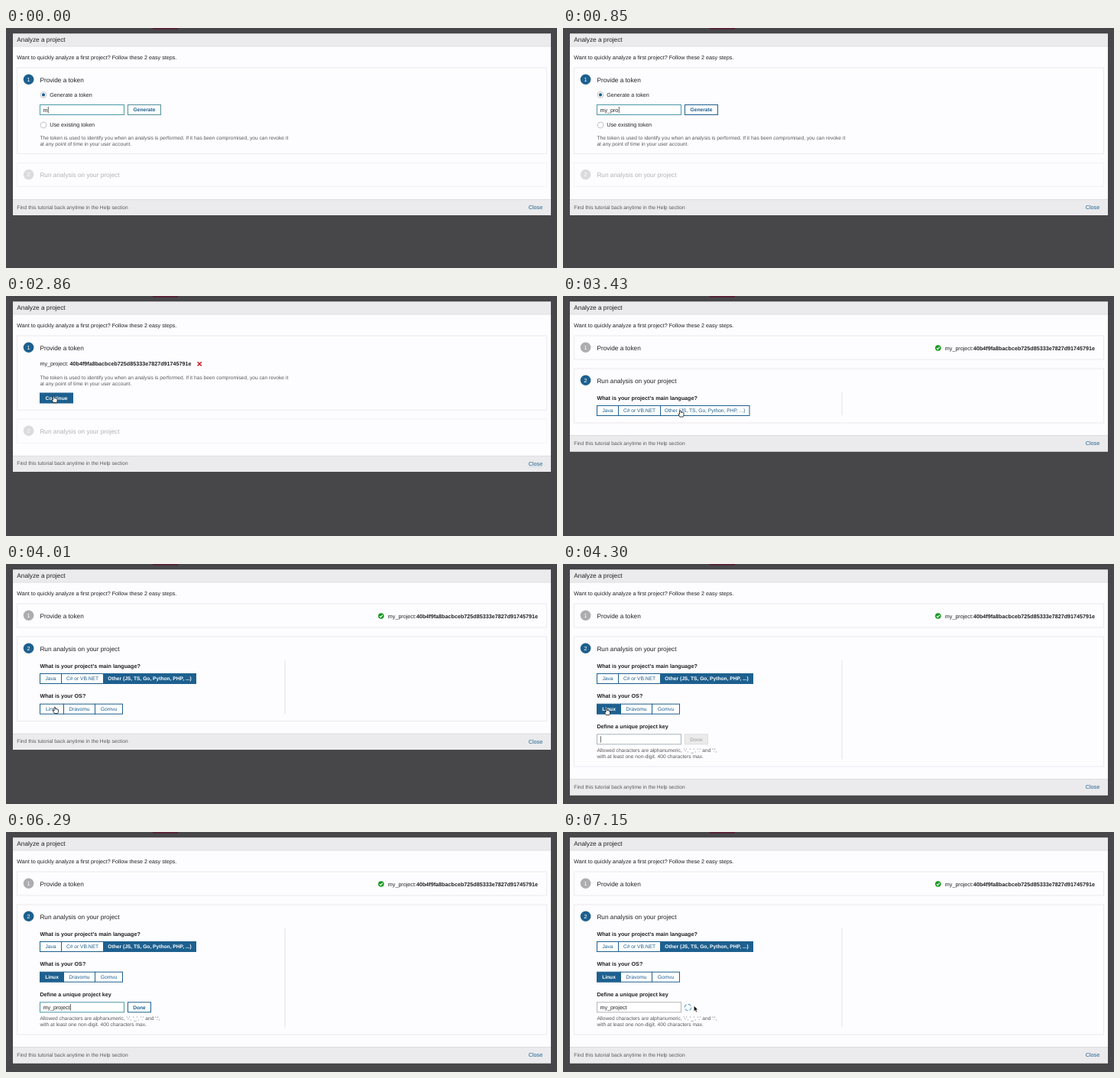
An HTML page for the animation above (7.29 s loop, 721x314 px).

```html
<!DOCTYPE html>
<html lang="en">
<head>
<meta charset="utf-8">
<title>Analyze a project</title>
<style>
  html, body { margin: 0; width: 100%; height: 100%; overflow: hidden; background: #474648; }
  svg { display: block; }
  text {
    font-family: "Liberation Sans", Arial, sans-serif;
    text-rendering: geometricPrecision;
    white-space: pre;
  }
</style>
</head>
<body>
<svg id="stage" width="721" height="314" viewBox="0 0 721 314"></svg>
<script>
const LOOP = 7290;
const INK = '#1f1f22', SOFT = '#59585c', BLUE = '#1d608f', FOCUS = '#4a9aa8';
const LINE = '#ebeaee', PALE = '#b3b2b6';
const NAME = 'my_project';
const TOKEN = '40b4f9fa8bacbceb725d85333e7827d91745791e';
const SMALL = 6.67, BODY = 7.2, HEAD = 8.25;

// Tables of [time, value...]; the last row reached applies.
const STAGES = [[0, 'form'], [2000, 'token'], [3000, 'language'], [3580, 'os'], [4300, 'key']];
const TYPED_TOKEN = [[0, 1], [140, 2], [290, 3], [570, 4], [710, 5], [850, 6], [1130, 8], [1280, 10]];
const TYPED_KEY = [[0, 0], [5010, 1], [5150, 2], [5300, 3], [5580, 4], [5720, 5], [5870, 6],
  [6010, 7], [6150, 8], [6290, 10]];
const POINTER = [
  [0, 'none', 0, 0],
  [1570, 'arrow', 126, 110], [1710, 'arrow', 160, 106], [1860, 'arrow', 178.5, 102.5],
  [2430, 'arrow', 164, 107], [2570, 'arrow', 116, 120], [2720, 'hand', 76, 130], [2860, 'hand', 62.6, 131],
  [3150, 'arrow', 74, 137], [3290, 'hand', 128, 148], [3430, 'hand', 153.5, 149.5],
  [3720, 'arrow', 130, 161], [3870, 'arrow', 90, 178], [4010, 'hand', 64, 187], [4150, 'hand', 57, 189],
  [4440, 'hand', 57.5, 190], [4590, 'hand', 58, 191], [5010, 'none', 0, 0],
  [6430, 'arrow', 112, 212], [6570, 'arrow', 166, 225], [6720, 'hand', 171.5, 227], [7010, 'arrow', 171.3, 227.3]
];

// Frame of each stage: first box bottom, second box top and bottom, footer top, dialog bottom.
const FRAMES = {
  form: [164.5, 176.5, 207.5, 224.5, 245],
  token: [149.3, 161, 192, 209.3, 230],
  language: [83, 95, 166, 182.5, 203.5],
  os: [83, 95, 205.5, 222, 243],
  key: [83, 95, 265, 281.5, 302.5]
};

const stage = document.getElementById('stage');
const ruler = document.createElement('canvas').getContext('2d');
ruler.font = '72px "Liberation Sans", Arial, sans-serif';
const widthOf = s => ruler.measureText(s).width * BODY / 72;

const last = (table, t) => table.filter(row => row[0] <= t).pop();

function rect(x, y, w, h, fill, stroke = 'none', rx = 0) {
  return `<rect x="${x}" y="${y}" width="${w}" height="${h}" rx="${rx}" fill="${fill}" stroke="${stroke}" stroke-width="1"/>`;
}
function label(x, y, s, size = BODY, fill = INK, bold = false, anchor = 'start') {
  return `<text x="${x}" y="${y}" font-size="${size}" fill="${fill}" text-anchor="${anchor}" font-weight="${bold ? 700 : 400}">${s}</text>`;
}
const disc = (x, y, r, fill, stroke = 'none') =>
  `<circle cx="${x}" cy="${y}" r="${r}" fill="${fill}" stroke="${stroke}" stroke-width=".9"/>`;
const stroke = (d, color, w = 1) =>
  `<path d="${d}" fill="none" stroke="${color}" stroke-width="${w}"/>`;

function step(n, title, top, state) {
  const fill = { on: BLUE, done: '#adacb0', off: '#dbdadd' }[state];
  return disc(29.6, top + 15.2, 6.8, fill)
    + label(29.6, top + 17.8, n, 7.2, '#fff', false, 'middle')
    + label(44.4, top + 18.8, title, HEAD, state === 'off' ? PALE : INK);
}

function button(x, y, w, text, style = 'plain', bold = true) {
  const [fill, edge, ink] = {
    plain: ['#fefefe', BLUE, BLUE],
    fresh: ['#fefefe', '#54909a', BLUE],
    full: [BLUE, BLUE, '#fff'],
    off: ['#ebebeb', '#dddde0', '#b4b4b6']
  }[style];
  return rect(x, y, w, 13, fill, edge)
    + label(x + w / 2, y + 8.9, text, SMALL, ink, bold, 'middle');
}

function field(y, text, caret, edge) {
  const x = 48.9 + widthOf(text) + .4;
  return rect(44.5, y, 110, 13, '#fff', edge)
    + label(48.4, y + 9.5, text)
    + (caret ? stroke(`M${x} ${y + 2.4}V${y + 10.8}`, INK, .7) : '');
}

function radio(y, on, text) {
  return disc(49, y, 3.9, '#fff', '#bdbcc0') + (on ? disc(49, y, 2.1, BLUE) : '')
    + label(57.2, y + 2.4, text);
}

function helpLines(y) {
  return label(44.4, y, 'The token is used to identify you when an analysis is performed. If it has been compromised, you can revoke it', SMALL, SOFT)
    + label(44.4, y + 7.8, 'at any point of time in your user account.', SMALL, SOFT);
}

function form(t) {
  const text = NAME.slice(0, last(TYPED_TOKEN, t)[1]);
  return radio(87.4, true, 'Generate a token')
    + field(100.5, text, true, FOCUS)
    + button(159.5, 100.5, 43, 'Generate', t < 140 ? 'fresh' : 'plain')
    + radio(127, false, 'Use existing token')
    + helpLines(146.4);
}

const tokenText = gap => `${NAME}:${gap}<tspan font-weight="700">${TOKEN}</tspan>`;

function tokenView(t) {
  return label(44.4, 91.3, tokenText(' '))
    + stroke('M250.6 86.2L255.8 91.4M255.8 86.2L250.6 91.4', '#c9252d', 1.5)
    + helpLines(108.9)
    + button(44.5, 127, 43, 'Continue', t >= 2720 ? 'full' : 'plain');
}

function spinner(t) {
  const turn = (t - 7150) / 140 * 34;
  return `<circle cx="163.5" cy="229.5" r="4.2" fill="none" stroke="#4b9fd5" stroke-width="1.1" pathLength="8" stroke-dasharray="1.35 .65" transform="rotate(${turn} 163.5 229.5)"/>`;
}

function keyView(t) {
  const text = NAME.slice(0, last(TYPED_KEY, t)[1]);
  const busy = t >= 7010;
  const style = !text ? 'off' : t >= 6720 ? 'full' : 'plain';
  return label(44.4, 214.6, 'Define a unique project key', BODY, INK, true)
    + field(222.8, text, t < 6720, busy ? '#b5b4b8' : text ? FOCUS : '#a6b5bd')
    + (busy ? spinner(last([[7010, 7010], [7150, 7150]], t)[1]) : button(159.5, 222.8, 30, 'Done', style))
    + label(44.4, 246.4, "Allowed characters are alphanumeric, '-', '_', '.' and ':',", SMALL, SOFT)
    + label(44.4, 254.2, 'with at least one non-digit. 400 characters max.', SMALL, SOFT);
}

function analysis(name, t) {
  const picked = name !== 'language', keyed = name === 'key';
  let out = disc(490.8, 68, 3.8, '#199a22')
    + stroke('M488.9 68.1L490.3 69.6L492.9 66.7', '#fff', 1.1)
    + label(696, 70.5, tokenText(''), BODY, INK, false, 'end')
    + stroke(`M365 126V${{ language: 156, os: 196, key: 255.5 }[name]}`, '#e3e2e6')
    + label(44.4, 135.6, "What is your project's main language?", BODY, INK, true)
    + button(44.5, 143.5, 28, 'Java', 'plain', false)
    + button(72.5, 143.5, 55, 'C# or VB.NET', 'plain', false)
    + button(127.5, 143.5, picked ? 121 : 116.5, 'Other (JS, TS, Go, Python, PHP, ...)', picked ? 'full' : 'plain', picked);
  if (picked) {
    out += label(44.4, 175.1, 'What is your OS?', BODY, INK, true)
      + button(44.5, 183.2, 31, 'Linux', keyed ? 'full' : 'plain', keyed)
      + button(75.5, 183.2, 41, 'Dravomu', 'plain', false)
      + button(116.5, 183.2, 36, 'Gomvu', 'plain', false);
  }
  return out + (keyed ? keyView(t) : '');
}

function pointer(t) {
  const [, kind, x, y] = last(POINTER, t);
  if (kind === 'none') return '';
  const arrow = kind === 'arrow';
  const d = arrow
    ? 'M0 0V7.4L1.7 5.8L2.8 8.4L4.1 7.9L3 5.3H5.3Z'
    : 'M-1 .7Q-.1 -.5 .7 .7V2.8Q1.6 2.2 2.1 3Q3 2.5 3.4 3.3Q4.4 3 4.5 4V6.2Q4.3 7.4 3.6 8.6H-.6Q-1.2 7.2 -2.6 5.4Q-3 4.2 -1 5.1Z';
  return `<path transform="translate(${x} ${y})" d="${d}" fill="${arrow ? '#111' : '#fff'}" stroke="${arrow ? '#fff' : '#111'}" stroke-width="${arrow ? .5 : .8}" stroke-linejoin="round"/>`;
}

function scene(t) {
  const name = last(STAGES, t)[1];
  const [end1, top2, end2, foot, bottom] = FRAMES[name];
  const early = name === 'form' || name === 'token';
  const content = name === 'form' ? form(t) : name === 'token' ? tokenView(t) : analysis(name, t);
  return rect(0, 0, 721, 314, '#474648')
    + rect(192, 0, 33, 1.5, '#5b1b31')
    + rect(9, 7.5, 704, bottom - 7.5, '#fdfcfe')
    + rect(9, 7.5, 704, 16.5, '#ebeaec')
    + stroke('M9 24H713', '#dad9dc', .8)
    + label(14.3, 18.3, 'Analyze a project', HEAD)
    + label(14.3, 41, 'Want to quickly analyze a first project? Follow these 2 easy steps.')
    + rect(14.5, 52, 693, end1 - 52, '#fdfcfe', LINE)
    + rect(14.5, top2, 693, end2 - top2, '#fdfcfe', early ? '#f3f2f5' : LINE)
    + step(1, 'Provide a token', 52, early ? 'on' : 'done')
    + step(2, 'Run analysis on your project', top2, early ? 'off' : 'on')
    + rect(9, foot, 704, bottom - foot, '#ebeaec')
    + stroke(`M9 ${foot}H713`, '#d8d7da', .8)
    + label(14.3, foot + 12, 'Find this tutorial back anytime in the Help section', 6.7, SOFT)
    + label(683.8, foot + 12.5, 'Close', BODY, BLUE)
    + (name === 'token' ? stroke(`M683.8 ${foot + 14}H702`, '#b9d0df', .6) : '')
    + content
    + pointer(t);
}

let shown = '';
function draw() {
  const next = scene(performance.now() % LOOP);
  if (next !== shown) stage.innerHTML = shown = next;
  requestAnimationFrame(draw);
}
draw();
</script>
</body>
</html>
```
